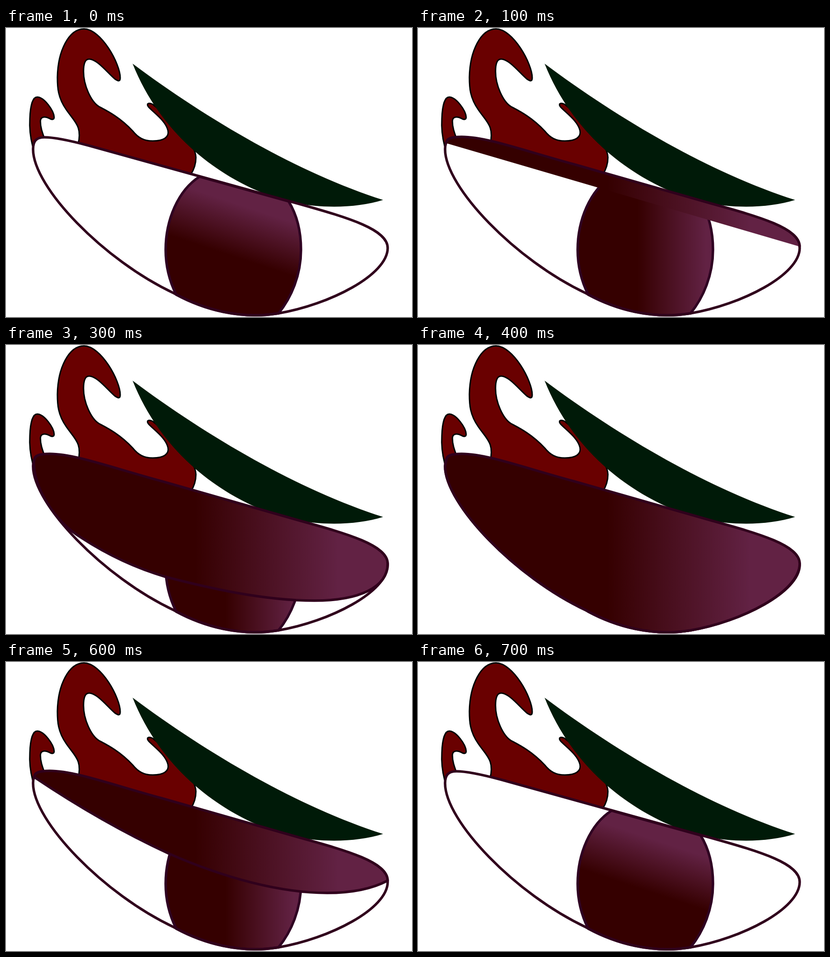
These frames come from a looping animation (885 px wide and 632 px high, 2.7 s). An HTML page with a canvas:

```html
<!DOCTYPE html>
<html lang="en">
<head>
<meta charset="utf-8">
<title>Blinking eye</title>
<style>
html, body { margin: 0; width: 100%; height: 100%; overflow: hidden; background: #fff; }
canvas { display: block; width: 885px; height: 632px; }
</style>
</head>
<body>
<canvas id="stage" width="885" height="632"></canvas>
<script>
const ctx = document.getElementById('stage').getContext('2d');
const LOOP = 2700, STEP = 100;
const INK = '#30001c', DARK = '#350000', PLUM = '#622244';

const flame = new Path2D(`M157 255C167 214 149 205 131 178C113 152 112 130 112 108
  C113 50 137 2 170 2C207 2 249 78 249 109C249 118 244 116 238 112
  C222 99 199 68 181 68C172 68 169 80 169 95C169 125 185 161 203 172
  C218 180 247 194 276 225C288 240 300 247 320 247C345 247 356 238 353 224
  C348 203 323 186 311 173C305 166 310 162 320 167C360 200 413 250 414 283
  C414 297 410 309 403 320`);
const wisp = new Path2D(`M58 258C52 235 51 215 52 198C53 170 58 151 68 151
  C83 151 104 180 105 195C105 201 100 201 95 198C86 193 75 193 75 204C75 217 79 228 84 242`);
const brow = new Path2D(`M276 78C440 201 640 318 822 376C740 402 620 392 553 358
  C458 318 337 232 276 78Z`);

// The lower rim runs from the right corner to the left one.
const rim = 'C832 540 705 605 594 624C510 638 430 615 366 580C213 508 59 348 59 265';
const eye = new Path2D(`M59 265C59 247 66 239 84 239C110 239 150 249 180 257L640 385
  C750 416 832 441 832 481${rim}Z`);
const iris = new Path2D(`M422 325C375 355 348 420 348 485C348 520 357 555 371 583
  C430 615 510 638 594 624C622 590 643 540 643 485C643 447 635 410 616 379Z`);

const lidTop = 'M62 251C62 242 72 238 95 238C150 238 230 268 340 298L640 384C745 413 832 438 832 478';
const lidEdges = [
  'L62 252',
  'C800 495 755 505 700 505C600 505 480 474 355 419C260 375 160 318 62 252',
  'C832 530 770 559 672 559C560 559 440 531 348 507C290 490 225 461 165 422C105 385 58 310 61 252',
  rim
];
const lids = lidEdges.map((edge, i) => ({
  shape: new Path2D(lidTop + edge + 'Z'),
  line: new Path2D(i ? lidTop + edge + 'Z' : lidTop)
}));
const blink = [-1, 0, 1, 2, 3, 2, 1, -1];

function gradient(x0, y0, x1, y1) {
  const g = ctx.createLinearGradient(x0, y0, x1, y1);
  g.addColorStop(0, DARK);
  g.addColorStop(1, PLUM);
  return g;
}
const openIris = gradient(488, 497, 523, 391);
const sideIris = gradient(478, 0, 628, 0);
const lidFill = gradient(412, 0, 725, 0);

function paint(fill, shape, stroke, width, line = shape) {
  ctx.fillStyle = fill;
  ctx.fill(shape);
  if (!stroke) return;
  ctx.strokeStyle = stroke;
  ctx.lineWidth = width;
  ctx.stroke(line);
}

function draw(time) {
  const step = Math.min(Math.floor(time % LOOP / STEP), blink.length - 1);
  const lid = lids[blink[step]];
  ctx.fillStyle = '#fff';
  ctx.fillRect(0, 0, 885, 632);
  ctx.lineJoin = 'round';
  paint('#690000', wisp, '#000', 3);
  paint('#690000', flame, '#000', 3);
  paint('#001a08', brow);
  paint('#fff', eye);
  paint(lid ? sideIris : openIris, iris, '#2f0222', 5.5);
  ctx.strokeStyle = INK;
  ctx.lineWidth = 5.5;
  ctx.stroke(eye);
  if (lid) paint(lidFill, lid.shape, INK, 5.5, lid.line);
}

const start = performance.now();
function tick() {
  draw(performance.now() - start);
  requestAnimationFrame(tick);
}
tick();
</script>
</body>
</html>
```
